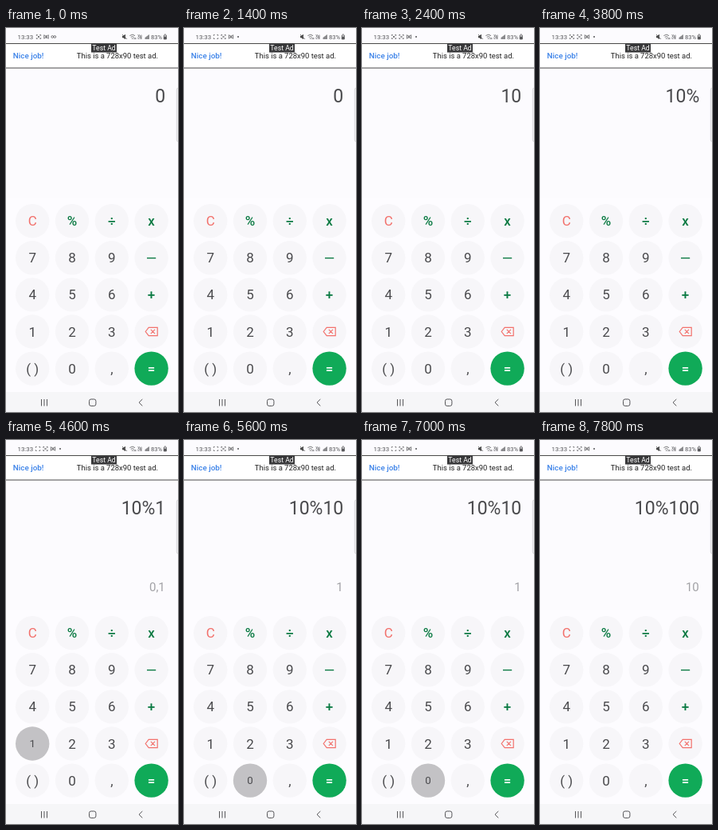
An HTML page that plays this animation: 216x480 px, repeating every 8000 ms.

```html
<!DOCTYPE html>
<html lang="en">
<head>
<meta charset="utf-8">
<style>
  html, body { margin: 0; width: 100%; height: 100%; overflow: hidden; background: #fcfbfe; }
  svg { display: block; width: 216px; height: 480px; font-family: Roboto, sans-serif; }
  .line { fill: none; stroke: #555558; stroke-width: 1; }
  .tiny { fill: none; stroke: #6a6a6d; stroke-width: .9; }
  .mid { text-anchor: middle; }
  .end { text-anchor: end; }
</style>
</head>
<body>
<svg viewBox="0 0 216 480">
  <defs>
    <path id="corners" class="tiny" d="M-2.7 -1.2V-2.5H-1.4M1.4 -2.5H2.7V-1.2M2.7 1.2V2.5H1.4M-1.4 2.5H-2.7V1.2"/>
    <path id="cross" class="tiny" d="M-1.3 -1.3L1.3 1.3M1.3 -1.3L-1.3 1.3"/>
    <path id="bow" class="tiny" d="M-2.7 -2.3V2.3L2.7 -2.3V2.3L-2.7 -2.3M0 -2V2"/>
  </defs>
  <rect y="212" width="216" height="243" fill="#fdfcff"/>
  <rect y="455" width="216" height="25" fill="#f6f6f8"/>

  <!-- status bar -->
  <g font-size="7.9" fill="#555558">
    <text x="14.5" y="13.8">13:33</text>
    <text x="182" y="13.8" font-size="7.6">83%</text>
    <text x="165.5" y="10.6" font-size="3.4" font-weight="700">Vo)</text>
    <text x="165.5" y="14" font-size="3.4" font-weight="700">LTE</text>
  </g>
  <g id="oldIcons">
    <use href="#corners" x="41" y="11"/><use href="#cross" x="41" y="11"/>
    <use href="#bow" x="50.5" y="11"/>
    <g class="tiny"><circle cx="58.3" cy="11" r="1.4"/><circle cx="61.3" cy="11" r="1.4"/></g>
  </g>
  <g id="newIcons">
    <use href="#corners" x="40" y="11"/><use id="castMark" href="#cross" x="40" y="11"/>
    <use href="#corners" x="49.5" y="11"/><use href="#cross" x="49.5" y="11"/>
    <use href="#bow" x="59" y="11"/>
    <circle cx="68" cy="11" r="1" fill="#555558"/>
  </g>
  <path d="M146 9.7H147.5L150 7.8V14.2L147.5 12.3H146Z" fill="#444"/>
  <path class="tiny" d="M146 8L152 14"/>
  <path class="tiny" d="M155.4 9.6Q158.7 6.8 162 9.6M156.8 11.4Q158.7 9.8 160.6 11.4M158.7 12.4V14M161 12V14.2M162.8 14.2V12"/>
  <path d="M174.5 14V12L180 8V14Z" fill="#8a8a8d"/>
  <path class="tiny" d="M198.2 9H201.4V14H198.2ZM199 8H200.6"/>
  <path d="M198.2 10.6H201.4V14H198.2Z" fill="#555558"/>

  <!-- banner -->
  <rect x="-1" y="19.5" width="218" height="30.5" fill="#fff" stroke="#4a4a4a"/>
  <text x="8.7" y="38" font-size="9.9" font-weight="500" fill="#3b82e8">Nice job!</text>
  <text x="88.8" y="38" font-size="9.45" fill="#222">This is a 728x90 test ad.</text>
  <rect x="107" y="19.5" width="32" height="11" fill="#38383a"/>
  <text class="mid" x="123" y="28.2" font-size="8.7" fill="#fff">Test Ad</text>

  <rect x="214.3" y="75" width="5" height="67" rx="2" fill="#f1f1f3" stroke="#d2d2d5" stroke-width=".8"/>
  <text id="entry" class="end" x="200.3" y="93.3" font-size="23" fill="#49494c"></text>
  <text id="result" class="end" x="199.8" y="188.5" font-size="15" fill="#a2a2a6"></text>
  <g id="keys"></g>

  <!-- navigation -->
  <path class="line" d="M44.5 464V472.5M48 464V472.5M51.5 464V472.5M171.3 464L167 468.2L171.3 472.4"/>
  <rect class="line" x="104.5" y="464" width="8.4" height="8.4" rx="2.3"/>
</svg>
<script>
const LOOP = 8000, STEP = 200;
const $ = id => document.getElementById(id);
const columns = [33.2, 83, 132.8, 182.6];
const rows = [["C", "%", "÷", "x"], ["7", "8", "9", "−"], ["4", "5", "6", "+"],
              ["1", "2", "3", "⌫"], ["( )", "0", ",", "="]];
const colors = { C: "#f2716c", "=": "#fff", "%": "#0b7a43", "÷": "#0b7a43",
                 x: "#0b7a43", "−": "#0b7a43", "+": "#0b7a43" };

function keyMarkup(label, x, y) {
  const color = colors[label] || "#4a4a4d";
  const weight = "÷x+=%".includes(label) ? 500 : 400;
  let face = `<text class="mid" y="6" font-size="17" font-weight="${weight}" fill="${color}">${label}</text>`;
  if (label === "−") face = `<path d="M-5.6 .3H5.6" stroke="${color}" stroke-width="1.4"/>`;
  if (label === "⌫") face = `<path d="M-7.4 0L-3.4 -5.2H7.6V5.2H-3.4ZM-.8 -2.6L4.4 2.6M4.4 -2.6L-.8 2.6"
    fill="none" stroke="#f2716c" stroke-width="1.2"/>`;
  return `<g transform="translate(${x} ${y})" data-key="${label}">
    <circle r="21.2" fill="${label === "=" ? "#10aa58" : "#f7f6f9"}"/>
    <circle class="ripple" r="21.2" fill="#c3c2c5" opacity="0"/><g class="face">${face}</g></g>`;
}

$("keys").innerHTML = rows.map((row, r) =>
  row.map((label, c) => keyMarkup(label, columns[c], 241.2 + r * 46.1)).join("")).join("");

// Each press: key, touch time, time the entry updates, release time, entry, result
const presses = [
  ["1", 1600, 1800, 2000, "1", ""],
  ["0", 2000, 2400, 2400, "10", ""],
  ["%", 3400, 3600, 3800, "10%", ""],
  ["1", 4400, 4600, 5000, "10%1", "0,1"],
  ["0", 5400, 5600, 6000, "10%10", "1"],
  ["0", 6800, 7400, 7800, "10%100", "10"],
];

function pressure(t, down, update, up) {
  if (t < down || t >= up) return 0;
  return t < down + STEP || t > update ? .5 : 1;
}

function draw(now) {
  const t = Math.floor(now % LOOP / STEP) * STEP;
  const amounts = {};
  let entry = "0", result = "";
  for (const [key, down, update, up, text, value] of presses) {
    amounts[key] = Math.max(amounts[key] || 0, pressure(t, down, update, up));
    if (t >= update) [entry, result] = [text, value];
  }
  $("entry").textContent = entry;
  $("result").textContent = result;
  for (const key in amounts) {
    const node = document.querySelector(`[data-key="${key}"]`);
    node.querySelector(".ripple").setAttribute("opacity", amounts[key]);
    node.querySelector(".face").setAttribute("transform", `scale(${1 - .22 * amounts[key]})`);
  }
  const settled = t >= 800;
  $("oldIcons").style.display = settled ? "none" : "";
  $("newIcons").style.display = settled ? "" : "none";
  $("castMark").style.display = t >= 2400 && t < 4200 ? "" : "none";
}

const start = performance.now();
function tick() {
  draw(performance.now() - start);
  requestAnimationFrame(tick);
}
tick();
</script>
</body>
</html>
```
